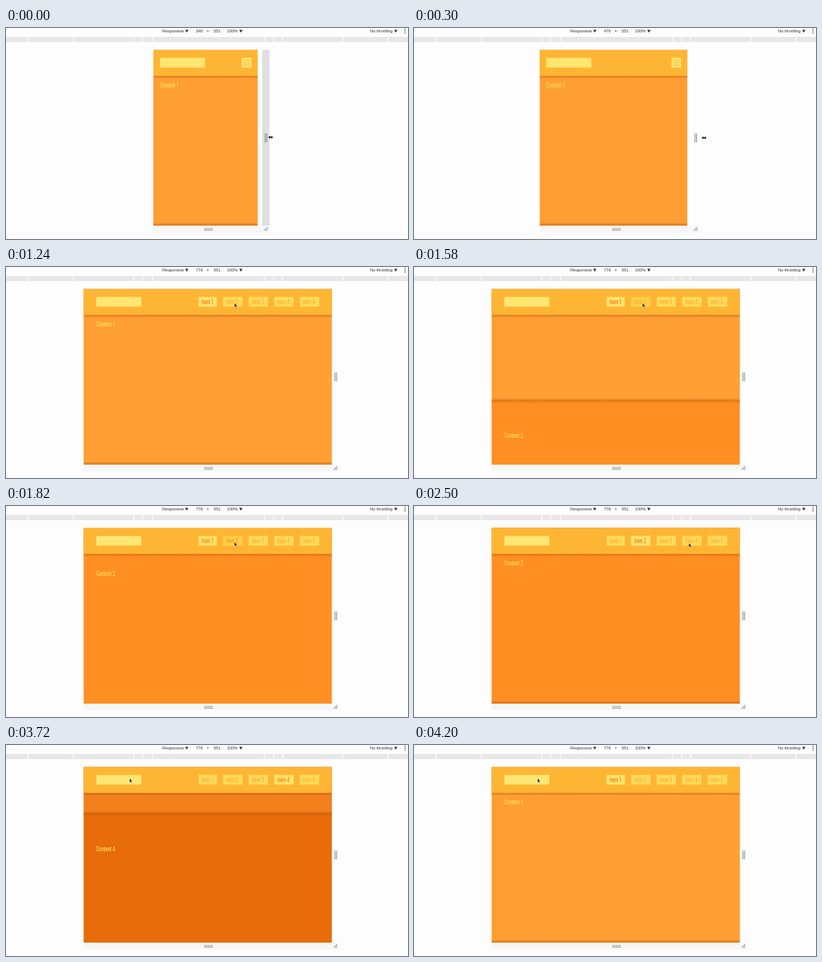
These frames come from a looping animation (540x284 px, 4220 ms). An HTML page:

```html
<!DOCTYPE html>
<html lang="en">
<head>
<meta charset="utf-8">
<title>Responsive menu demo</title>
<style>
  html, body { margin: 0; width: 100%; height: 100%; overflow: hidden; background: #fdfdfd; }
  svg { display: block; width: 100vw; height: 100vh; }
  .bar { font: 5.6px "Liberation Sans", Arial, sans-serif; fill: #333; }
  .site { font: 500 9px Roboto, "Liberation Sans", sans-serif; }
</style>
</head>
<body>
<svg id="stage" viewBox="0 0 540 284" xmlns="http://www.w3.org/2000/svg">
  <defs>
    <clipPath id="pageClip"><rect id="clipBox" y="29.5" height="236.5"/></clipPath>
    <linearGradient id="edge" x1="0" y1="0" x2="0" y2="1">
      <stop offset="0" stop-color="#a33c00" stop-opacity="0"/>
      <stop offset=".55" stop-color="#a33c00" stop-opacity=".36"/>
      <stop offset="1" stop-color="#a33c00" stop-opacity="0"/>
    </linearGradient>
  </defs>
  <rect width="540" height="284" fill="#fdfdfd"/>
  <g class="bar">
    <text x="210" y="6">Responsive</text>
    <text id="widthLabel" x="255" y="6"></text>
    <text x="269.5" y="6">×</text>
    <text x="279" y="6">551</text>
    <text x="297" y="6">100%</text>
    <text x="489" y="6">No throttling</text>
    <path d="M240.500 2.400h4.600l-2.300 3.800zM313.200 2.400h4.600l-2.300 3.800zM521.300 2.400h4.600l-2.300 3.800z"/>
    <circle cx="536" cy="1.700" r=".75"/><circle cx="536" cy="4.200" r=".75"/><circle cx="536" cy="6.700" r=".75"/>
  </g>
  <rect y="12" width="540" height="7" fill="#e7e7e7"/>
  <path d="M30 12v7M90.500 12v7M171.500 12v7M183.500 12v7M196.500 12v7M347 12v7M359.500 12v7M371.500 12v7M452.500 12v7M513.500 12v7" stroke="#fdfdfd" stroke-width="1.200"/>

  <rect id="frame" y="29.5" height="236.5" fill="#fff"/>
  <rect id="handle" y="29.5" width="10" height="236.5"/>
  <rect id="footer" y="266" height="9" fill="#f7f7f7"/>
  <path d="M266 270h12M266 272.200h12" stroke="#888" stroke-width=".9"/>
  <path id="grip" d="M4 142v12M6.200 142v12" stroke="#777" stroke-width=".9"/>
  <path id="corner" d="M2.300 273l5-5M5 273l2.300-2.300" stroke="#666" stroke-width=".9"/>

  <g clip-path="url(#pageClip)">
    <g id="sections"></g>
    <g id="header">
      <rect id="headerShade" y="62" height="6" fill="url(#edge)"/>
      <rect id="headerBox" y="29.5" height="35" fill="#ffb534"/>
      <rect id="logo" y="40.300" width="60.500" height="13" fill="#ffe672"/>
      <g id="burger">
        <rect y="40" width="13" height="13.300" fill="#ffe672"/>
        <path d="M2 43.300h9M2 46.700h9M2 50h9" stroke="#ffb534" stroke-width="1.100"/>
      </g>
      <g id="menu"></g>
    </g>
  </g>
  <path id="arrow" d="M0 0V5.200L1.200 4.200L2 6L3 5.600L2.200 3.800H3.800Z" fill="#111" stroke="#fff" stroke-width=".35"/>
  <path id="resizer" d="M-3.200 0L-1 -2V-.7H1V-2L3.200 0L1 2V.7H-1V2Z" fill="#111"/>
</svg>
<script>
const LOOP = 4220, SCALE = 0.43, CENTER = 271, TOP = 29.5, VIEW = 236, CONDENSED = 0.64;
const BREAKPOINT = 600, FADE = 200, SCROLL_TIME = 560;
const COLORS = ['#ff9f33', '#ff8f23', '#f07f1c', '#e86c0a', '#dc5f04'];
const SCROLLS = [[1351, 0, 1], [2780, 1, 3], [3613, 3, 0]];
const POINTER = [[790, 450, 148], [1200, 307, 48.7], [2200, 307, 48.7], [2560, 374, 50], [2960, 374, 50], [3521, 166, 45]];

const $ = id => document.getElementById(id);
const clamp = v => Math.min(1, Math.max(0, v));
const mix = (a, b, p) => a + (b - a) * p;
const ramp = (t, a, b) => clamp((t - a) / (b - a));
const smooth = p => p * p * (3 - 2 * p);
const swing = p => 0.5 - Math.cos(Math.PI * p) / 2;
const blend = (a, b, p) => `rgb(${a.map((v, i) => Math.round(mix(v, b[i], p)))})`;

function set(el, attrs) {
  for (const name in attrs) el.setAttribute(name, attrs[name]);
}

function add(parent, tag, attrs = {}, text = '') {
  const el = document.createElementNS('http://www.w3.org/2000/svg', tag);
  set(el, attrs);
  el.textContent = text;
  return parent.appendChild(el);
}

const place = (el, x, y = 0) => el.setAttribute('transform', `translate(${x} ${y})`);
const label = (parent, text, x, y, fill) =>
  add(parent, 'text', { class: 'site', fill, transform: `translate(${x} ${y}) scale(${CONDENSED} 1)` }, text);

const sections = COLORS.map((fill, i) => {
  const group = add($('sections'), 'g');
  const shade = add(group, 'rect', { y: -4, height: 7, fill: 'url(#edge)' });
  const box = add(group, 'rect', { height: VIEW + 1, fill });
  group.append(shade);
  const title = add(group, 'g');
  label(title, `Content ${i + 1}`, 0, 50, '#ffe25c');
  return { group, shade, box, title };
});

const items = COLORS.map((_, i) => {
  const width = i ? 26 : 24.6;
  const group = add($('menu'), 'g');
  const box = add(group, 'rect', { x: -width, y: 40.3, width, height: 13 });
  const text = label(group, `item ${i + 1}`, 4.2 - width, 50, '#000');
  return { group, box, text };
});

function scrollAt(t) {
  let pos = 0;
  for (const [start, from, to] of SCROLLS) {
    if (t >= start) pos = mix(from, to, swing(ramp(t, start, start + SCROLL_TIME)));
  }
  return pos;
}

const activeAt = t => Math.floor(scrollAt(t) + 0.149);
const hoverAt = t => t > 1230 && t < 2270 ? 1 : t > 2500 && t < 3130 ? 3 : -1;

// Share of the last fade period during which the state held.
function faded(stateAt, value, t) {
  const steps = 20;
  let hits = 0;
  for (let k = 0; k < steps; k++) hits += stateAt(t - k * FADE / steps) === value;
  return hits / steps;
}

function pointerAt(t) {
  let [, x, y] = POINTER[0];
  for (let i = 1; i < POINTER.length; i++) {
    const [t0, x0, y0] = POINTER[i - 1], [t1, x1, y1] = POINTER[i];
    if (t >= t0) {
      const p = smooth(ramp(t, t0, t1));
      x = mix(x0, x1, p);
      y = mix(y0, y1, p);
    }
  }
  return [x, y];
}

function drawFrame(t, width) {
  const size = width * SCALE, left = CENTER - size / 2, right = left + size;
  const grey = 1 - ramp(t, 100, 250);
  $('widthLabel').textContent = Math.round(width);
  set($('frame'), { x: left, width: size });
  set($('handle'), { x: right, fill: blend([253, 253, 253], [224, 224, 224], grey) });
  set($('footer'), { x: left, width: size + 10 });
  place($('grip'), right);
  place($('corner'), right);
  $('grip').style.display = t > 500 && t < 700 ? 'none' : '';
  return { left, size };
}

function drawPage(t, width, frame) {
  const dragging = t < 550;
  const left = frame.left - (dragging ? 0 : 9 * (1 - ramp(t, 560, 720)));
  const size = frame.size - (dragging ? 6 : 0);
  const wide = width >= BREAKPOINT;
  const pad = wide ? 17.2 : 9;
  const span = { x: left, width: size };
  for (const id of ['clipBox', 'headerBox', 'headerShade']) set($(id), span);
  $('logo').setAttribute('x', left + pad);
  place($('burger'), left + size - pad - 12.5);
  $('burger').style.display = wide ? 'none' : '';
  $('menu').style.display = wide ? '' : 'none';

  const scroll = scrollAt(t);
  sections.forEach(({ group, shade, box, title }, i) => {
    place(group, 0, TOP + (i - scroll) * VIEW);
    set(shade, span);
    set(box, span);
    place(title, left + pad);
  });
  items.forEach(({ group, box, text }, i) => {
    const active = faded(activeAt, i, t), hover = faded(hoverAt, i, t);
    place(group, left + size - pad - (4 - i) * 34.35);
    const base = [255, mix(219, 228, active), mix(91, 108, active)];
    box.setAttribute('fill', blend(base, [255, 206, 70], hover));
    text.setAttribute('fill', blend([255, 174, 48], [243, 119, 16], active));
  });
}

function draw(t) {
  const width = mix(340, 776, smooth(ramp(t, 20, 775)));
  drawPage(t, width, drawFrame(t, width));
  const resizing = t < 790;
  $('resizer').style.display = resizing ? '' : 'none';
  $('arrow').style.display = resizing ? 'none' : '';
  const drag = smooth(ramp(t, 0, 750));
  place($('resizer'), mix(355.5, 452, drag), mix(147, 149, drag));
  place($('arrow'), ...pointerAt(t));
}

const began = performance.now();
function tick() {
  draw((performance.now() - began) % LOOP);
  requestAnimationFrame(tick);
}
tick();
</script>
</body>
</html>
```
